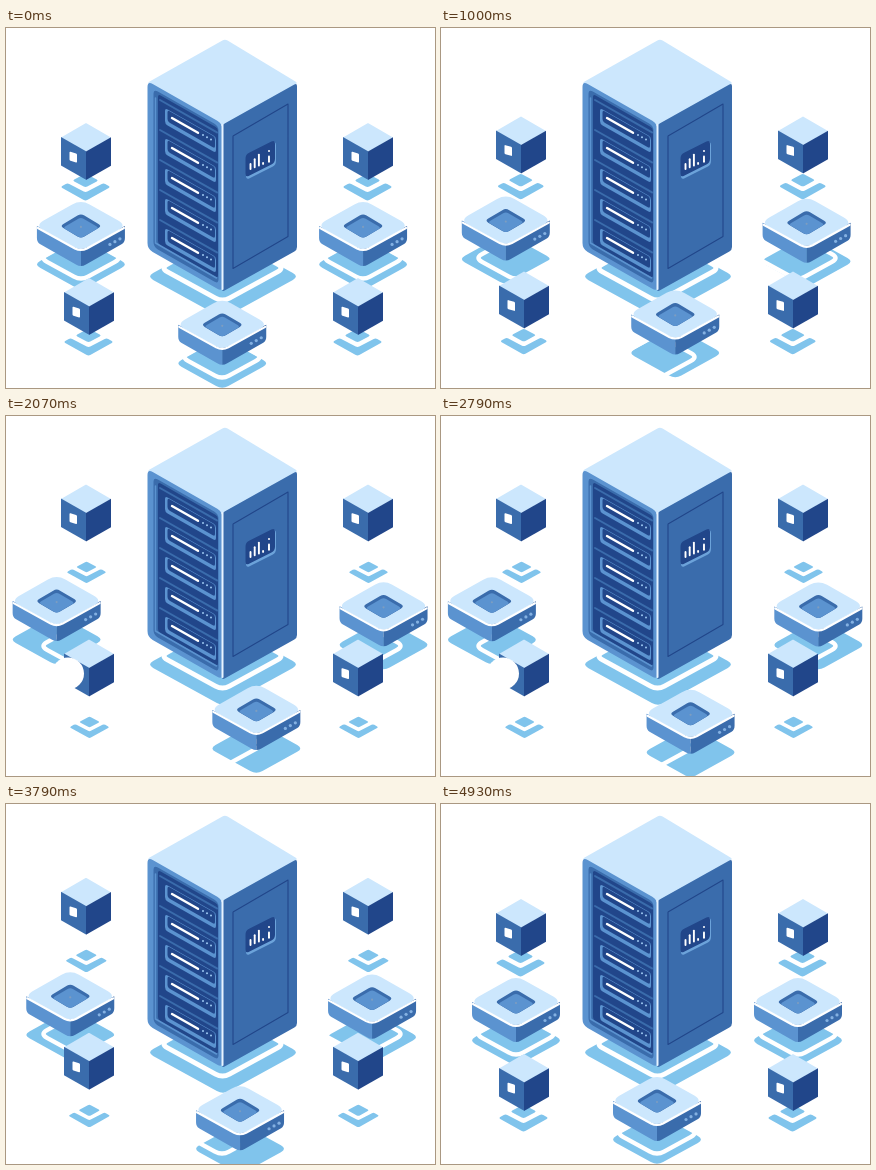
Write an HTML page that moves like this. It is 429 px wide and 360 px high and loops after 5 s.

```html
<!DOCTYPE html>
<html lang="en">
<head>
<meta charset="utf-8">
<title>Server rack</title>
<style>
html, body { margin: 0; width: 100%; height: 100%; overflow: hidden; background: #fff; }
svg { display: block; width: 429px; height: 360px; }
</style>
</head>
<body>
<svg id="stage" viewBox="0 0 429 360"></svg>
<script>
const LOOP = 5000, STEP = LOOP / 70, ISO = 0.57;
const C = { top: '#cce7fd', light: '#5b93d0', mid: '#3a6cac', dark: '#21468a', shade: '#80c4ec', white: '#fff' };

const repeat = (n, fn) => Array.from({ length: n }, (_, i) => fn(i)).join('');
const path = (d, fill, extra = '') => `<path d="${d}" fill="${fill}" ${extra}/>`;
const outline = (d, color, w) => path(d, 'none', `stroke="${color}" stroke-width="${w}" stroke-linecap="round" stroke-linejoin="round"`);
const dot = (x, y, r, fill, extra = '') => `<circle cx="${x}" cy="${y}" r="${r}" fill="${fill}" ${extra}/>`;

// Closed polygon with rounded corners.
function rounded(pts, r) {
  const n = pts.length;
  const toward = (p, q) => {
    const k = r / Math.hypot(q[0] - p[0], q[1] - p[1]);
    return [p[0] + (q[0] - p[0]) * k, p[1] + (q[1] - p[1]) * k];
  };
  return pts.map((p, i) =>
    `${i ? 'L' : 'M'}${toward(p, pts[(i + n - 1) % n])}Q${p} ${toward(p, pts[(i + 1) % n])}`).join('') + 'Z';
}
const rhomb = (x, y, w, h, r) => rounded([[x - w, y], [x, y - h], [x + w, y], [x, y + h]], r);

// Upright parallelogram: x, y is its upper left corner, slope tilts the other edges.
const slant = (x, y, w, h, slope, r = 0) =>
  rounded([[x, y], [x + w, y + w * slope], [x + w, y + w * slope + h], [x, y + h]], r);
const slope = (x, y, w, k) => `M${x} ${y}l${w} ${w * k}`;

// Parts below have their top vertex at the local origin.
function cube() {
  return path(rhomb(0, 14.5, 25, 14.5, 0.5), C.top) +
    path(slant(-25, 14, 25, 28.5, ISO), C.mid) +
    path(slant(0, 28.5, 25, 28.5, -ISO), C.dark) +
    path(slant(-16.5, 28.5, 7.5, 9, 0.3, 1), C.white);
}

function cubeShade() {
  return path(rhomb(0, 5, 13, 7, 2), C.shade) +
    path(rounded([[-25, 11.5], [-18, 7.5], [0, 17], [18, 7.5], [25, 11.5], [0, 25.5]], 2), C.shade);
}

function slab() {
  const side = s => path(`M0 46L${s * 44} 25V37Q${s * 44} 41 ${s * 41} 43L${s * 5} 63.5Q${s * 2.5} 65 0 65Z`, s < 0 ? C.light : C.mid);
  return side(-1) + side(1) +
    path(rhomb(0, 24.5, 46, 26, 10), C.top) +
    outline('M-43 27L-6 47.5Q0 50.5 6 47.5L43 27', C.white, 2.2) +
    path(rhomb(0, 25, 21, 12.5, 4), C.mid) +
    path(rhomb(0, 26.7, 18, 10.5, 3), C.light) +
    dot(0, 26, 1.1, '#7d9dc0') +
    repeat(3, i => dot(29 + 5 * i, 43.5 - 2.8 * i, 1.6, '#84b1e2'));
}
const slabShade = () => path(rhomb(0, 63.5, 47, 26, 7), C.shade);
const ring = (x, y, w, h, width) => outline(rhomb(x, y, w, h, 8), C.white, width);

function rackUnit(i) {
  const y = 80 + 30 * i;
  return outline(slope(154, y - 8, 57, ISO), C.mid, 2) +
    path(slant(159, y, 51, 16, ISO, 3), C.light) +
    path(slant(161.5, y + 2, 47.5, 11.5, ISO, 2.5), C.dark) +
    outline(slope(166, y + 10, 26, ISO), C.white, 2.4) +
    repeat(3, k => dot(197 + 4 * k, y + 27 + 2.3 * k, 1, '#9cc8f2'));
}

function tower() {
  const bar = (i, h) => outline(`M${244.5 + 4.2 * i} ${141 - 1.7 * i}v${-h}`, C.white, 1.9);
  return path(rounded([[219, 11], [292, 55], [216, 98], [141, 55]], 3), C.top) +
    path(slant(141.5, 53, 75, 168, ISO, 6), C.light) +
    path(slant(216, 97, 75, 167, -0.56, 3), C.mid) +
    path(slant(147.5, 61, 65, 158, ISO, 5), C.mid) +
    path(slant(152, 66, 60, 150, ISO, 3), C.dark) +
    outline('M149.5 70V215l61 35', C.light, 1.5) +
    repeat(5, rackUnit) +
    outline('M216.5 97V261', '#e8f4ff', 2) +
    outline(slant(227, 108, 55, 132.5, -0.58), C.dark, 1.1) +
    path(slant(240, 128, 30, 24, -0.5, 4), '#6ca3da') +
    path(slant(239.5, 126.5, 29.5, 23, -0.5, 4), C.dark) +
    repeat(3, i => bar(i, 5 + 3 * i)) + bar(3, 1) + bar(4.4, 5) + bar(4.4, 0.1) +
    dot(263, 123, 1, C.white);
}

const slabs = [[75, 173], [357, 173], [216, 272]];
const cubes = [[80, 95], [83, 250], [362, 95], [352, 250]];
const groups = (list, name, draw) => list.map((_, i) => `<g id="${name}${i}">${draw()}</g>`).join('');

const stage = document.getElementById('stage');
stage.innerHTML =
  path(rhomb(217, 248.5, 76, 42, 7), C.shade) +
  ring(216.5, 240, 62, 34, 5) +
  groups(slabs, 'slabShade', slabShade) +
  slabs.map(([x, y]) => ring(x, y + 57, 41, 22.5, 4.5)).join('') +
  groups(cubes, 'cubeShade', cubeShade) +
  tower() +
  groups(slabs, 'slab', slab) +
  groups(cubes, 'cube', cube);

const el = id => document.getElementById(id);
el('cube1').insertAdjacentHTML('beforeend', dot(-21, 34, 16, C.white, 'id="bite"'));

const move = (id, x, y, k = 1) =>
  el(id).setAttribute('transform', `translate(${x.toFixed(2)} ${y.toFixed(2)}) scale(${k.toFixed(3)})`);
const ease = u => (1 - Math.cos(Math.PI * Math.min(1, Math.max(0, u)))) / 2;
// Rises over [a, b] and falls back over [c, d].
const pulse = (t, a, b, c, d) => ease((t - a) / (b - a)) - ease((t - c) / (d - c));

function draw(t) {
  const u = (t + 90) / LOOP % 1;
  const sway = pulse(u, 0, 0.5, 0.5, 1);
  const right = pulse(u, 0, 0.25, 0.5, 0.75), down = pulse(u, 0.25, 0.5, 0.75, 1);
  const shifts = [
    [-25.5 * sway, -13.5 * sway],
    [21.5 * sway, -8 * sway],
    [19 * right + 18.5 * down, -11 * right + 9.5 * down],
  ];
  slabs.forEach(([x, y], i) => {
    const [dx, dy] = shifts[i];
    move('slabShade' + i, x + dx, y + dy);
    move('slab' + i, x + dx, y + dy);
  });

  const lift = pulse(t, 450, 2100, 3300, 4950);
  cubes.forEach(([x, y], i) => {
    move('cube' + i, x, y - 26.5 * lift);
    move('cubeShade' + i, x - 0.5 + lift, y + 52.5 - 0.5 * lift, 1 - 0.2 * lift);
  });
  el('bite').setAttribute('visibility', lift > 0.86 ? 'visible' : 'hidden');
}

function tick() {
  const t = performance.now() % LOOP;
  draw(Math.floor((t + 2) / STEP) * STEP % LOOP);
  requestAnimationFrame(tick);
}
tick();
</script>
</body>
</html>
```
